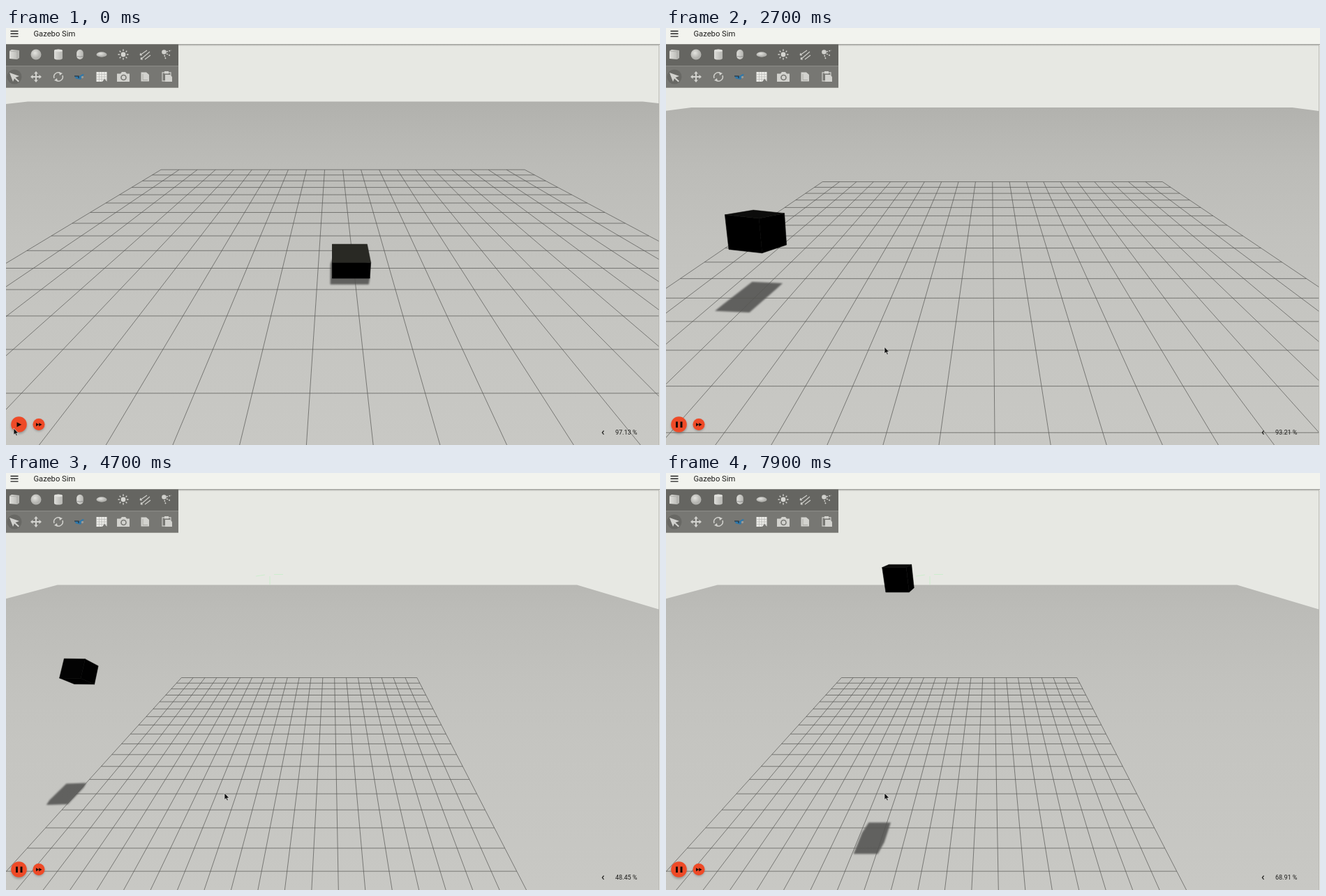
These frames come from a looping animation (937 px wide and 598 px high, 8 s). An HTML page with a canvas:

```html
<!DOCTYPE html>
<html lang="en">
<head>
<meta charset="utf-8">
<title>Gazebo Sim</title>
<style>
html, body { margin: 0; width: 100%; height: 100%; overflow: hidden; background: #e7e8e3; }
canvas, svg { position: absolute; left: 0; top: 0; width: 937px; height: 598px; }
text { font-family: Roboto, "Open Sans", sans-serif; fill: #1c1c1a; }
</style>
</head>
<body>
<canvas id="scene" width="937" height="598"></canvas>
<svg viewBox="0 0 937 598">
  <defs>
    <linearGradient id="solid" x2="1"><stop stop-color="#dededa"/><stop offset="1" stop-color="#b4b4b0"/></linearGradient>
    <radialGradient id="ball" cx=".4" cy=".35"><stop stop-color="#e2e2de"/><stop offset="1" stop-color="#b2b2ae"/></radialGradient>
    <linearGradient id="drop" x2="0" y2="1"><stop stop-color="#949490"/><stop offset="1" stop-color="#949490" stop-opacity="0"/></linearGradient>
    <filter id="soft" x="-50%" y="-50%" width="200%" height="200%"><feGaussianBlur stdDeviation="1.6"/></filter>
  </defs>

  <rect width="937" height="23" fill="#f2f3ee"/>
  <rect y="23" width="937" height="3" fill="url(#drop)"/>
  <path d="M935.7 24V598" stroke="#b4b4b0"/>
  <path d="M936.5 24V598" stroke="#e6e6e2"/>
  <path d="M6.500 4.500H17.500M6.500 8.300H17.500M6.500 12.100H17.500" stroke="#222" stroke-width="1.4"/>
  <text x="39.500" y="12" font-size="11.2">Gazebo Sim</text>

  <rect y="23.500" width="247" height="31" fill="#656561"/>
  <rect y="54.500" width="247" height="31.200" fill="#777773"/>

  <g transform="translate(0 38)" fill="url(#solid)">
    <path d="M5-5 8-7 19-6V5L16 7 5 6Z"/>
    <path d="M5-5 16-4V7M16-4 19-6" fill="none" stroke="#a4a4a0" stroke-width=".7"/>
    <circle cx="43" r="7.500" fill="url(#ball)"/>
    <path d="M69-5.500A6 2 0 0 1 81-5.500V5.500A6 2 0 0 1 69 5.500Z"/>
    <ellipse cx="75" cy="-5.500" rx="6" ry="1.800" fill="#e0e0dc"/>
    <rect x="101.200" y="-7" width="9.600" height="14" rx="4.800"/>
    <path d="M101.500 2.500Q106 4 110.500 2.500" fill="none" stroke="#777" stroke-width=".7"/>
    <ellipse cx="137" rx="7.500" ry="3.700" fill="url(#ball)"/>
    <g transform="translate(168)" stroke="#d4d4d0" stroke-width="1.400">
      <circle r="3.400" fill="#d4d4d0" stroke="none"/>
      <path d="M0-7.500V-5M0 7.500V5M-7.500 0H-5M7.500 0H5M-5.300-5.300-3.600-3.600M5.300 5.300 3.600 3.600M-5.300 5.300-3.600 3.600M5.300-5.300 3.600-3.600"/>
    </g>
    <path d="M202-6 192 1M206-4 193 7M207 1 199 7M192 1l1-3M192 1l3 0M193 7l1-3M193 7l3 0" stroke="#d0d0cc" stroke-width="1.100" fill="none"/>
    <circle cx="226.500" cy="-3.500" r="3.300" fill="#d0d0cc"/>
    <path d="M230-4 237-6M230-1 236 2M227 1 229 7" stroke="#d0d0cc" stroke-width="1.600" stroke-dasharray="2 1.500"/>
  </g>

  <g transform="translate(0 70)" fill="#d2d2ce">
    <circle cx="12" r="10.500" fill="#686864"/>
    <path d="M5-6 19-1 13.500 1 19 6 17.500 7.500 12 2.500 10 7Z"/>
    <path d="M43-8 46-4.500H44V-1H47.500V-3L51 0 47.500 3V1H44V4.500H46L43 8 40 4.500H42V1H38.500V3L35 0 38.500-3V-1H42V-4.500H40Z"/>
    <path d="M69 2A6 6 0 0 1 78-5M81-2A6 6 0 0 1 72 5" fill="none" stroke="#d2d2ce" stroke-width="1.500"/>
    <path d="M76-7 81-5 77-2ZM74 7 69 5 73 2Z"/>
    <path d="M98-1.500 105-1 110-4 112-3 108.500 0 107 4 100 2.500Z" fill="#2f78aa"/>
    <path d="M98-1H104V2" stroke="#25272a" stroke-width="1.100" fill="none"/>
    <circle cx="109.500" cy=".5" r="1.700" fill="#9a9a96"/>
    <rect x="129.500" y="-7" width="15" height="14" fill="#ecece8"/>
    <path d="M129.500-3.500H144.500M129.500 0H144.500M129.500 3.500H144.500M133.500-7V7M137-7V7M141-7V7" stroke="#b7b7b3" stroke-width=".7"/>
    <path d="M138 7 141 3 145 7Z" fill="#777773"/>
    <path d="M159-4.500H164L166-7H171L173-4.500H177V7H159Z"/>
    <circle cx="168.500" cy="1" r="4.300" fill="#777773"/><circle cx="168.500" cy="1" r="2.700"/>
    <path d="M193.500-6.500H201L205-3V6.500H193.500Z"/>
    <path d="M196-4V4.500H203" stroke="#a2a29e" stroke-width=".8" fill="none"/>
    <path d="M224-6H236V6H224Z" fill="none" stroke="#c6c6c2" stroke-width="1.300"/>
    <path d="M227-8H233V-4.500H227ZM228-3H235L238 0V7H228Z"/>
  </g>

  <g fill="#555" opacity=".4" filter="url(#soft)"><circle cx="18.500" cy="570.500" r="11.500"/><circle cx="47" cy="570" r="8.500"/></g>
  <g fill="#ee4a27"><circle cx="18.500" cy="568.500" r="11.300"/><circle cx="47" cy="568.500" r="8.500"/></g>
  <path id="play" d="M15.500 565.300 22.300 568.800 15.500 572.300Z" fill="#180a06"/>
  <path id="pause" d="M14 564.500H17V573H14ZM20.500 564.500H23.500V573H20.500Z" fill="#180a06"/>
  <path d="M43 566.300 47.200 568.800 43 571.300ZM47.200 566.300 51.500 568.800 47.200 571.300Z" fill="#180a06"/>

  <path d="M856.500 577.500 854.300 580.200 856.500 583" fill="none" stroke="#1c1c1a" stroke-width="1.200"/>
  <text id="rate" x="873" y="583" font-size="9"></text>
  <path id="cursor" d="M0 0V9.500L2.200 7.500 3.700 11 5.300 10.300 3.800 7H6.800Z" fill="#111" stroke="#f4f4f0" stroke-width=".6"/>
</svg>
<script>
const ctx = document.getElementById('scene').getContext('2d');
const el = id => document.getElementById(id);
const LOOP = 8000, STEP = 100, DEG = Math.PI / 180;
const FOCAL = 467.5, CX = 466.3, CY = 311, SIN = Math.sin(.5), COS = Math.cos(.5);
const SUN = [.483, -.097, .87];

// time, x, y, z, yaw, roll, pitch, real-time factor
const boxKeys = [
  [1000, 0, .1, 0, 0, 0, 0, 97.13],
  [2000, -.05, 4.476, .471, 11, 4, 3, 91.02],
  [2700, .03, 6.97, 1.69, 6, 3.5, 15, 93.21],
  [3500, -.07, 8.9, 3.354, -.5, 1.5, 31, 83.69],
  [4700, -.02, 9.885, 5.33, -1.6, 1.7, 44.5, 48.45],
  [6800, -.02, 4.945, 8.68, 0, 0, 80, 63.4],
  [7900, -.02, 1.29, 9.837, 0, 0, 91, 68.91]
];
const cameraKeys = [
  [2500, -7.73, .625, 4.972],
  [2700, -8.63, .06, 5.944],
  [3400, -14.81, -2.74, 12.374]
];
const cursorKeys = [[0, 11, 574], [100, 17, 573], [500, 17, 573], [600, 20, 573],
  [2100, 20, 573], [2500, 313, 457.5], [3800, 313, 457.5], [4600, 313, 459]];

const dot = (a, b) => a[0] * b[0] + a[1] * b[1] + a[2] * b[2];
const sub = (a, b) => a.map((v, i) => v - b[i]);
const unit = a => a.map(v => v / Math.hypot(...a));

// Piecewise curve through keys; smooth adds weighted tangents.
function sample(keys, t, smooth) {
  const last = keys.length - 1;
  if (t <= keys[0][0]) return keys[0].slice(1);
  if (t >= keys[last][0]) return keys[last].slice(1);
  const i = keys.findIndex(k => k[0] > t) - 1;
  const span = keys[i + 1][0] - keys[i][0], u = (t - keys[i][0]) / span;
  const slope = (j, c) => (keys[j + 1][c] - keys[j][c]) / (keys[j + 1][0] - keys[j][0]);
  const tangent = (j, c) => {
    if (j === 0) return slope(0, c);
    if (j === last) return slope(last - 1, c);
    const before = keys[j][0] - keys[j - 1][0], after = keys[j + 1][0] - keys[j][0];
    return (slope(j - 1, c) * after + slope(j, c) * before) / (before + after);
  };
  return keys[i].slice(1).map((a, n) => {
    const c = n + 1, b = keys[i + 1][c];
    if (!smooth) return a + (b - a) * u;
    const v = 1 - u;
    return a * v * v * (1 + 2 * u) + b * u * u * (3 - 2 * u) +
      span * (tangent(i, c) * u * v * v - tangent(i + 1, c) * u * u * v);
  });
}

function project(p, cam) {
  const [x, y, z] = sub(p, cam);
  const depth = COS * x - SIN * z;
  return [CX - FOCAL * y / depth, CY - FOCAL * (SIN * x + COS * z) / depth];
}

function trace(points, cam) {
  points.forEach((p, i) => ctx[i ? 'lineTo' : 'moveTo'](...project(p, cam)));
}

function boxAxes(yaw, roll, pitch) {
  const [sa, ca, sb, cb, sp, cp] = [yaw, roll, pitch].flatMap(d => [Math.sin(d * DEG), Math.cos(d * DEG)]);
  const front = [ca, -sa, 0], left = [sa * cb, ca * cb, sb], up = [-sa * sb, -ca * sb, cb];
  return [
    front.map((f, i) => f * cp - up[i] * sp),
    left,
    up.map((v, i) => v * cp + front[i] * sp)
  ];
}

function boxFaces(center, axes) {
  const faces = [];
  for (let a = 0; a < 3; a++) for (const side of [1, -1]) {
    const normal = axes[a].map(v => v * side), u = axes[(a + 1) % 3], v = axes[(a + 2) % 3];
    const points = [[1, 1], [-1, 1], [-1, -1], [1, -1]].map(([m, n]) => {
      const p = center.map((c, i) => c + (normal[i] + m * u[i] + n * v[i]) / 2);
      p[2] = Math.max(0, p[2]);
      return p;
    });
    faces.push({ normal, points });
  }
  return faces;
}

function shade(normal, center, cam) {
  const lit = dot(normal, SUN);
  if (lit <= 0) return '#000';
  const mirror = normal.map((n, i) => 2 * lit * n - SUN[i]);
  const gloss = Math.max(0, dot(mirror, unit(sub(cam, center))));
  const c = Math.round(12 * lit + 75 * gloss ** 7);
  return `rgb(${c},${c},${Math.round(c * .88)})`;
}

function drawGround(cam) {
  const near = Math.max(-50, cam[0] + (.2 - SIN * cam[2]) / COS);
  const paint = ctx.createLinearGradient(0, 100, 0, 598);
  [[0, 176], [.12, 184], [.2, 188], [.4, 194], [.6, 197], [1, 200]]
    .forEach(([at, c]) => paint.addColorStop(at, `rgb(${c},${c},${c - 4})`));
  ctx.fillStyle = paint;
  ctx.beginPath();
  trace([[near, 50, 0], [50, 50, 0], [50, -50, 0], [near, -50, 0]], cam);
  ctx.fill();
}

function drawGrid(cam) {
  ctx.strokeStyle = '#555552';
  ctx.lineWidth = .7;
  ctx.beginPath();
  for (let i = -10; i <= 10; i++) {
    trace([[i, -10, 0], [i, 10, 0]], cam);
    trace([[-10, i, 0], [10, i, 0]], cam);
  }
  ctx.stroke();
}

function drawShadow(faces, cam) {
  ctx.save();
  ctx.filter = 'blur(1px)';
  ctx.fillStyle = 'rgba(0,0,0,.51)';
  ctx.beginPath();
  for (const { normal, points } of faces) {
    if (dot(normal, SUN) <= 0) continue;
    trace(points.map(([x, y, z]) => [x - z * .5556, y + z * .1111, 0]), cam);
    ctx.closePath();
  }
  ctx.fill();
  ctx.restore();
}

function drawBox(faces, center, cam) {
  ctx.lineWidth = .5;
  for (const { normal, points } of faces) {
    if (dot(normal, sub(cam, points[0])) <= 0) continue;
    ctx.fillStyle = ctx.strokeStyle = shade(normal, center, cam);
    ctx.beginPath();
    trace(points, cam);
    ctx.closePath();
    ctx.fill();
    ctx.stroke();
  }
}

function drawFaintMark() {
  ctx.strokeStyle = 'rgba(195,240,198,.75)';
  ctx.lineWidth = 1;
  ctx.beginPath();
  ctx.moveTo(358, 148); ctx.lineTo(371, 146);
  ctx.moveTo(384, 145.5); ctx.lineTo(397, 145.5);
  ctx.moveTo(378, 148); ctx.lineTo(378, 160);
  ctx.stroke();
}

function render(t) {
  const cam = sample(cameraKeys, t);
  const [x, y, z, yaw, roll, pitch, rate] = sample(boxKeys, t, true);
  const center = [x, y, z], faces = boxFaces(center, boxAxes(yaw, roll, pitch));
  ctx.fillStyle = '#e7e8e3';
  ctx.fillRect(0, 0, 937, 598);
  drawGround(cam);
  drawShadow(faces, cam);
  drawGrid(cam);
  if (t >= 3400) drawFaintMark();
  drawBox(faces, center, cam);

  const running = t >= 600;
  el('play').style.display = running ? 'none' : '';
  el('pause').style.display = running ? '' : 'none';
  el('rate').textContent = rate.toFixed(2) + ' %';
  el('cursor').setAttribute('transform', `translate(${sample(cursorKeys, t)})`);
}

const start = performance.now();
function tick() {
  const t = (performance.now() - start) % LOOP;
  render(Math.floor(t / STEP) * STEP);
  requestAnimationFrame(tick);
}
tick();
</script>
</body>
</html>
```
